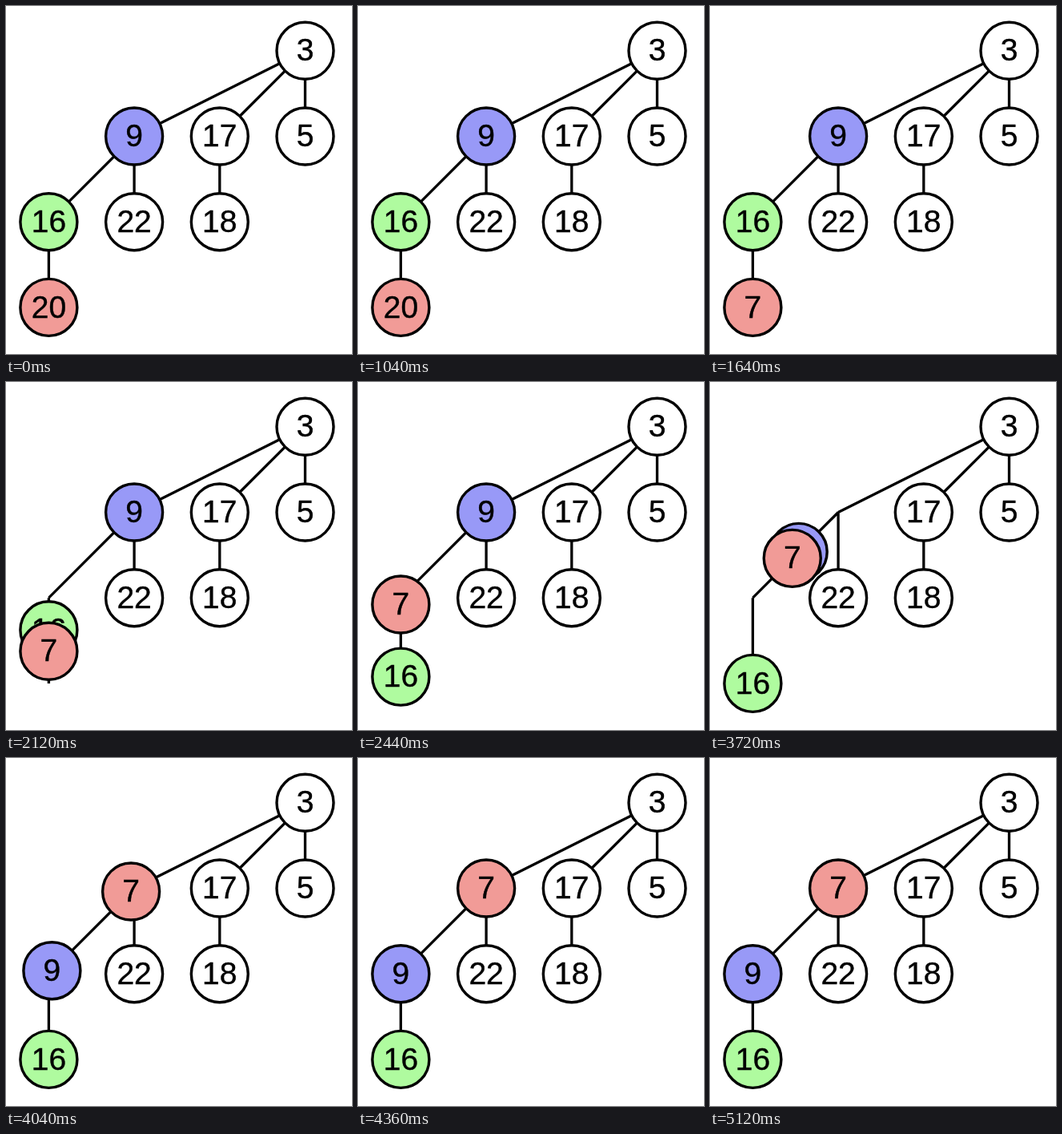
An HTML page with a canvas that plays this animation: 432x434 px, repeating every 5880 ms.

```html
<!DOCTYPE html>
<html lang="en">
<head>
<meta charset="utf-8">
<title>Heap: decrease key</title>
<style>
  html, body { margin: 0; width: 432px; height: 434px; overflow: hidden; background: #fff; }
  canvas { display: block; }
</style>
</head>
<body>
<canvas id="stage" width="432" height="434"></canvas>
<script>
const ctx = document.getElementById('stage').getContext('2d');
const LOOP = 5880, SWAP = 800;
const KEY_CHANGE = 1300, FIRST_SWAP = 1785, SECOND_SWAP = 3340;
const RED = '#f19b97', GREEN = '#affb9f', BLUE = '#9899f7', WHITE = '#fff';

const slot = (col, row) => ({ x: 53.4 + col * 106.7, y: 55.8 + row * 106.7 });
const root = slot(3, 0), parent = slot(1, 1), child = slot(0, 2), leaf = slot(0, 3);
const mid = slot(2, 1), right = slot(3, 1), midLeaf = slot(2, 2), sibling = slot(1, 2);
const edges = [[root, parent], [root, mid], [root, right], [parent, child],
               [parent, sibling], [mid, midLeaf], [child, leaf]];

const clamp = u => Math.min(1, Math.max(0, u));
const ease = u => (1 - Math.cos(Math.PI * clamp(u))) / 2;
const mix = (a, b, k) => ({ x: a.x + (b.x - a.x) * k, y: a.y + (b.y - a.y) * k });

function node(p, label, fill = WHITE) {
  ctx.beginPath();
  ctx.arc(p.x, p.y, 35.5, 0, 2 * Math.PI);
  ctx.fillStyle = fill;
  ctx.fill();
  ctx.lineWidth = 3.4;
  ctx.stroke();
  // A hairline gives the digits slightly more weight.
  ctx.fillStyle = '#000';
  ctx.lineWidth = 0.4;
  ctx.fillText(label, p.x, p.y + 12.6);
  ctx.strokeText(label, p.x, p.y + 12.6);
}

function draw(t) {
  const first = ease((t - FIRST_SWAP) / SWAP);
  const second = ease((t - SECOND_SWAP) / SWAP);

  ctx.fillStyle = WHITE;
  ctx.fillRect(0, 0, 432, 434);
  ctx.strokeStyle = '#000';
  ctx.lineWidth = 3.3;
  ctx.font = '39px "Liberation Sans", Helvetica, Arial, sans-serif';
  ctx.textAlign = 'center';

  // Edges join fixed slots; nodes travel over them.
  ctx.beginPath();
  for (const [a, b] of edges) {
    ctx.moveTo(a.x, a.y);
    ctx.lineTo(b.x, b.y);
  }
  ctx.stroke();

  node(root, 3);
  node(mid, 17);
  node(right, 5);
  node(sibling, 22);
  node(midLeaf, 18);
  node(mix(child, leaf, first), 16, GREEN);
  node(mix(parent, child, second), 9, BLUE);
  node(mix(mix(leaf, child, first), parent, second), t < KEY_CHANGE ? 20 : 7, RED);
}

const start = performance.now();
function tick() {
  draw((performance.now() - start) % LOOP);
  requestAnimationFrame(tick);
}
tick();
</script>
</body>
</html>
```
